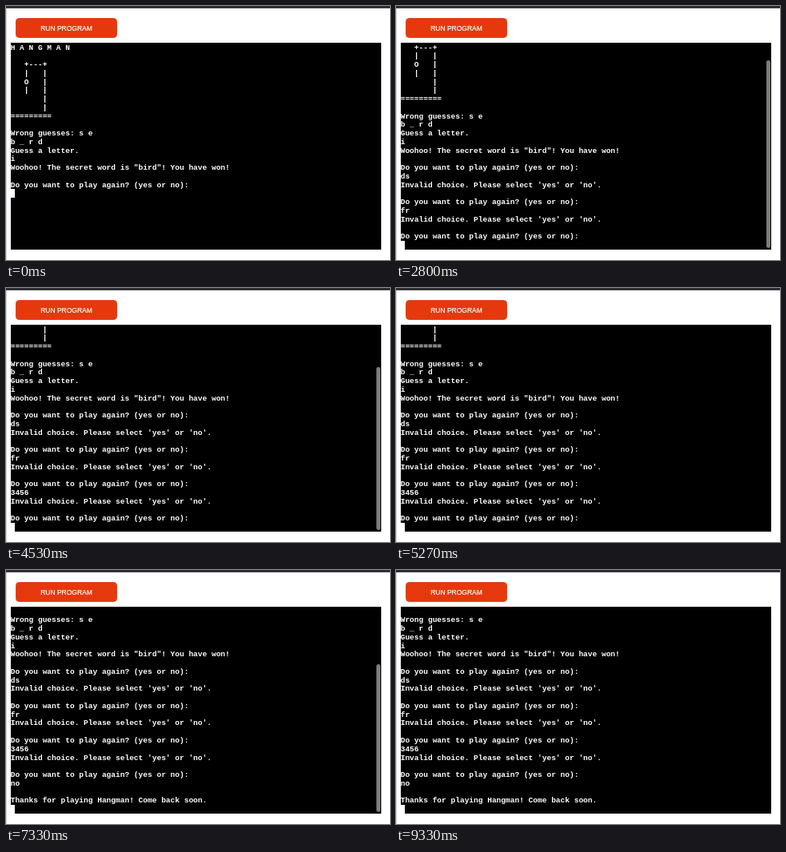
An HTML page that plays this animation: 480 px wide and 318 px high, repeating every 9590 ms.

```html
<!DOCTYPE html>
<html lang="en">
<head>
<meta charset="utf-8">
<title>Word game console</title>
<style>
  html, body { margin: 0; width: 100%; height: 100%; overflow: hidden; background: #fff; }
  #stage { position: relative; width: 480px; height: 318px; overflow: hidden; background: #fff; }
  #stage > * { position: absolute; box-sizing: border-box; }
  #edge { left: 0; top: 0; width: 1px; height: 318px; background: #d4d3d5; }
  #bar { left: 0; top: 0; width: 480px; height: 3px; background: linear-gradient(#2c2930 75%, #77747a); }
  #run {
    left: 12px; top: 14.5px; width: 127px; height: 25.5px; border-radius: 4.5px;
    border: 1px solid #d94a26; background: #e5390d; color: #fff; text-align: center;
    font: 8.5px/24px "Liberation Sans", Arial, sans-serif; -webkit-text-stroke: .2px #fff;
  }
  #console { left: 5.7px; top: 46px; width: 463.3px; height: 258.6px; background: #000; overflow: hidden; }
  #console > * { position: absolute; }
  #text {
    left: 0; top: 1.5px; margin: 0; color: #fff; white-space: pre;
    font: bold 9.52px/10.77px "Liberation Mono", "Courier New", monospace;
  }
  #caret { width: 5.71px; height: 11.2px; background: #fff; }
  #thumb { left: 457.8px; width: 4.7px; border-radius: 2.4px; background: #7c7c7c; }
</style>
</head>
<body>
<div id="stage">
  <div id="edge"></div>
  <div id="bar"></div>
  <div id="run">RUN PROGRAM</div>
  <div id="console">
    <pre id="text"></pre>
    <div id="caret"></div>
    <div id="thumb"></div>
  </div>
</div>
<script>
const LOOP = 9590, ROWS = 24, ROW_H = 10.77, COL_W = 5.713;
const TRACK_TOP = 2, TRACK_H = 255, FADE_STEP = 67;

const ask = "\nDo you want to play again? (yes or no):\n";
const invalid = "Invalid choice. Please select 'yes' or 'no'.\n" + ask;
const opening = [
  "H A N G M A N", "",
  "   +---+",
  "   |   |",
  "   O   |",
  "   |   |",
  "       |",
  "       |",
  "=========", "",
  "Wrong guesses: s e",
  "b _ r d",
  "Guess a letter.",
  "i",
  'Woohoo! The secret word is "bird"! You have won!',
  ask
].join("\n");

// [time, text added to the console]
const output = [
  [0, opening],
  [70, "d"], [670, "s"], [1730, "\n" + invalid],
  [2270, "f"], [2470, "r"], [2800, "\n" + invalid],
  [3130, "34"], [3330, "5"], [3800, "6"], [4400, "\n"], [4530, invalid],
  [6400, "n"], [6530, "o"],
  [7330, "\n\nThanks for playing Hangman! Come back soon.\n"]
];

// [shown, fade start, fade steps]
const thumbShows = [[2800, 3330, 5], [4400, 5130, 3], [7330, 7870, 4]];

const [text, caret, thumb] = ["text", "caret", "thumb"].map(id => document.getElementById(id));

function thumbOpacity(t) {
  const show = thumbShows.filter(s => s[0] <= t).pop();
  if (!show) return 0;
  const [, fade, steps] = show;
  if (t < fade) return 1;
  return Math.max(0, 1 - (Math.floor((t - fade) / FADE_STEP) + 1) / steps);
}

function draw(t) {
  const lines = output.filter(o => o[0] <= t).map(o => o[1]).join("").split("\n");
  const hidden = Math.max(0, lines.length - ROWS);
  const shown = lines.slice(hidden);
  const content = shown.join("\n");
  if (text.textContent !== content) text.textContent = content;

  caret.style.left = shown[shown.length - 1].length * COL_W + "px";
  caret.style.top = (shown.length - 1) * ROW_H + "px";

  const top = TRACK_H * hidden / lines.length;
  thumb.style.top = TRACK_TOP + top + "px";
  thumb.style.height = TRACK_H - top + "px";
  thumb.style.opacity = thumbOpacity(t);
}

function tick() {
  draw(performance.now() % LOOP);
  requestAnimationFrame(tick);
}
tick();
</script>
</body>
</html>
```
